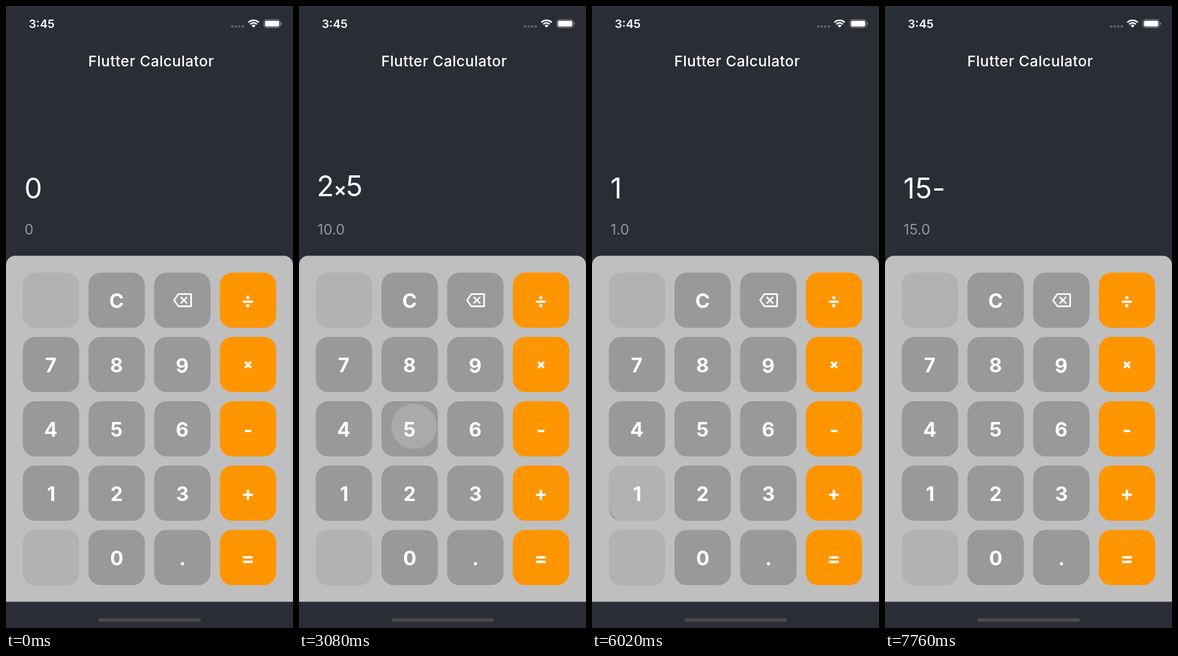
An HTML page with a canvas that plays this animation: 508x1102 px, repeating every 8 s.

```html
<!DOCTYPE html>
<html lang="en">
<head>
<meta charset="utf-8">
<title>Flutter Calculator</title>
<style>
  html, body { margin: 0; width: 100%; height: 100%; overflow: hidden; background: #292d36; }
  canvas { display: block; width: 100vw; height: 100vh; }
</style>
</head>
<body>
<canvas id="stage"></canvas>
<script>
const W = 508, H = 1102, LOOP = 8000;
const KEY = { x: 29.7, y: 472.3, w: 99.8, h: 97.8, dx: 116.25, dy: 114, r: 22 };
const ROWS = [' C<÷', '789×', '456-', '123+', ' 0.='];
const COLORS = { bg: '#292d36', panel: '#bfbfbf', key: '#999999', off: '#b2b2b2', op: '#ff9500' };

// Ripple timing in ms: fade in, growth, full fade-out
const FADE_IN = 75, GROW = 225, GONE = 375, GLOW = 0.24;

// Moments at which the screen repaints
const REPAINTS = [
  0, 500, 560, 620, 680, 1520, 1580, 1640, 1700, 1760,
  3080, 3140, 3200, 3380, 3860, 3920, 3980, 4040, 4100, 4160,
  6020, 6080, 6260, 6560, 6620, 6680, 6860,
  7400, 7460, 7520, 7580, 7640, 7700, 7760
];

// start: touch time; dx, dy: touch point relative to the key centre
const TAPS = [
  { key: '2', start: 315, dx: 0, dy: 0, expr: '2', result: '2.0' },
  { key: '×', start: 1416, dx: 0, dy: 0, expr: '2×', result: '2.0' },
  { key: '5', start: 3029, dx: 12, dy: -7, expr: '2×5', result: '10.0' },
  { key: '=', start: 3785, dx: 0, dy: 0, expr: '10.0', result: '10.0' },
  { key: '1', start: 5913, dx: 16, dy: -14, expr: '1', result: '1.0' },
  { key: '5', start: 6330, dx: 0, dy: 0, expr: '15', result: '15.0' },
  { key: '-', start: 7378, dx: -2.5, dy: -1.5, expr: '15-', result: '15.0' }
];

const canvas = document.getElementById('stage');
const ctx = canvas.getContext('2d');
const dpr = window.devicePixelRatio || 1;
canvas.width = Math.round(W * dpr);
canvas.height = Math.round(H * dpr);

// cubic-bezier(.25, .1, .25, 1)
function ease(x) {
  if (x >= 1) return 1;
  const bez = (u, a, b) => 3 * (1 - u) * (1 - u) * u * a + 3 * (1 - u) * u * u * b + u * u * u;
  let lo = 0, hi = 1;
  for (let i = 0; i < 24; i++) {
    const mid = (lo + hi) / 2;
    if (bez(mid, 0.25, 0.25) < x) lo = mid; else hi = mid;
  }
  return bez(lo, 0.1, 1);
}

function setFont(weight, size, spacing = 0) {
  ctx.font = `${weight} ${size}px Inter, "Open Sans", sans-serif`;
  ctx.letterSpacing = spacing + 'px';
}

function roundRect(x, y, w, h, r, color) {
  ctx.beginPath();
  ctx.roundRect(x, y, w, h, r);
  if (color) {
    ctx.fillStyle = color;
    ctx.fill();
  }
}

function disc(x, y, r, color) {
  ctx.beginPath();
  ctx.arc(x, y, r, 0, Math.PI * 2);
  ctx.fillStyle = color;
  ctx.fill();
}

function cross(x, y, half, width) {
  ctx.beginPath();
  ctx.moveTo(x - half, y - half);
  ctx.lineTo(x + half, y + half);
  ctx.moveTo(x + half, y - half);
  ctx.lineTo(x - half, y + half);
  ctx.lineWidth = width;
  ctx.strokeStyle = '#fff';
  ctx.stroke();
}

// Text whose visible left edge sits at x
function textLeft(str, x, y, color) {
  const m = ctx.measureText(str);
  ctx.fillStyle = color;
  ctx.fillText(str, x + m.actualBoundingBoxLeft, y);
}

// Text whose visible box is centred on (x, y)
function textCentre(str, x, y) {
  const m = ctx.measureText(str);
  ctx.fillStyle = '#fff';
  ctx.fillText(str,
    x + (m.actualBoundingBoxLeft - m.actualBoundingBoxRight) / 2,
    y + (m.actualBoundingBoxAscent - m.actualBoundingBoxDescent) / 2);
}

function drawWifi(x, y) {
  const a = Math.PI * 0.25;
  ctx.strokeStyle = '#fff';
  ctx.lineWidth = 2.7;
  for (const r of [13, 8.4]) {
    ctx.beginPath();
    ctx.arc(x, y, r, -Math.PI / 2 - a, -Math.PI / 2 + a);
    ctx.stroke();
  }
  ctx.beginPath();
  ctx.moveTo(x, y);
  ctx.arc(x, y, 5.2, -Math.PI / 2 - a, -Math.PI / 2 + a);
  ctx.fillStyle = '#fff';
  ctx.fill();
}

function drawStatus() {
  setFont(600, 20.5);
  textLeft('3:45', 41.3, 38.8, '#fff');
  for (let i = 0; i < 4; i++) disc(400.4 + i * 6.25, 36.4, 2.3, '#5d6067');
  drawWifi(438.2, 38.3);
  roundRect(456.5, 24.1, 29, 14.2, 4.4);
  ctx.strokeStyle = '#85878c';
  ctx.lineWidth = 1.3;
  ctx.stroke();
  roundRect(458.4, 26, 25.2, 10.4, 2.6, '#fff');
  roundRect(486.8, 28.9, 1.7, 4.8, [0, 1.7, 1.7, 0], '#85878c');
}

function drawBackspace(x, y) {
  ctx.beginPath();
  ctx.moveTo(x - 14.6, y);
  ctx.lineTo(x - 7, y - 10.8);
  ctx.lineTo(x + 15.6, y - 10.8);
  ctx.lineTo(x + 15.6, y + 10.8);
  ctx.lineTo(x - 7, y + 10.8);
  ctx.closePath();
  ctx.lineJoin = 'round';
  ctx.lineWidth = 2.8;
  ctx.strokeStyle = '#fff';
  ctx.stroke();
  cross(x + 2.8, y, 5.8, 2.8);
}

function drawLabel(label, x, y) {
  setFont(700, 35);
  if (label === '<') drawBackspace(x, y);
  else if (label === '×') cross(x, y + 0.6, 5.2, 4);
  else if (label === '.') textCentre(label, x, y + 10.6);
  else if ('÷-+='.includes(label)) textCentre(label, x, y + 2.8);
  else textCentre(label, x, y + 0.9);
}

function drawRipple(tap, age, x, y) {
  const full = Math.hypot(KEY.w, KEY.h) / 2;
  const k = ease(age / GROW);
  const radius = full * 0.3 + (full * 0.7 + 5) * k;
  const fadeOut = (GONE - age) / (GONE - GROW);
  const alpha = GLOW * Math.min(1, age / FADE_IN, fadeOut);
  disc(x + tap.dx * (1 - k), y + tap.dy * (1 - k), radius, `rgba(255,255,255,${alpha})`);
}

function drawKey(label, col, row, time) {
  const x = KEY.x + col * KEY.dx, y = KEY.y + row * KEY.dy;
  const cx = x + KEY.w / 2, cy = y + KEY.h / 2;
  const color = label === ' ' ? COLORS.off : col === 3 ? COLORS.op : COLORS.key;
  roundRect(x, y, KEY.w, KEY.h, KEY.r, color);
  for (const tap of TAPS) {
    const age = time - tap.start;
    if (tap.key !== label || age <= 0 || age >= GONE) continue;
    ctx.save();
    roundRect(x, y, KEY.w, KEY.h, KEY.r);
    ctx.clip();
    drawRipple(tap, age, cx, cy);
    ctx.restore();
  }
  if (label !== ' ') drawLabel(label, cx, cy);
}

function drawDisplay(expr, result) {
  setFont(400, 50, 0.6);
  const [left, right] = expr.split('×');
  const baseline = right === undefined ? 340.5 : 336.5;
  textLeft(left, 34.5, baseline, '#fff');
  if (right !== undefined) {
    cross(73, 327, 7.2, 4);
    textLeft(right, 86, baseline, '#fff');
  }
  setFont(400, 25, 0.2);
  textLeft(result, 33.8, 405, '#94969a');
}

function draw(t) {
  const time = REPAINTS.filter(r => r <= t).pop();
  const last = TAPS.filter(tap => tap.start < time).pop() || { expr: '0', result: '0' };

  ctx.setTransform(canvas.width / W, 0, 0, canvas.height / H, 0, 0);
  ctx.fillStyle = COLORS.bg;
  ctx.fillRect(0, 0, W, H);

  drawStatus();
  setFont(500, 26, 0.5);
  textLeft('Flutter Calculator', 147.5, 107, '#fff');
  drawDisplay(last.expr, last.result);

  roundRect(0, 442.5, W, 613, [16, 16, 0, 0], COLORS.panel);
  ROWS.forEach((row, j) => [...row].forEach((label, i) => drawKey(label, i, j, time)));
  roundRect(163.5, 1084.4, 181.5, 6.6, 3.3, '#4a4a4b');
}

const begin = performance.now();
function tick() {
  draw((performance.now() - begin) % LOOP);
  requestAnimationFrame(tick);
}
tick();
</script>
</body>
</html>
```
